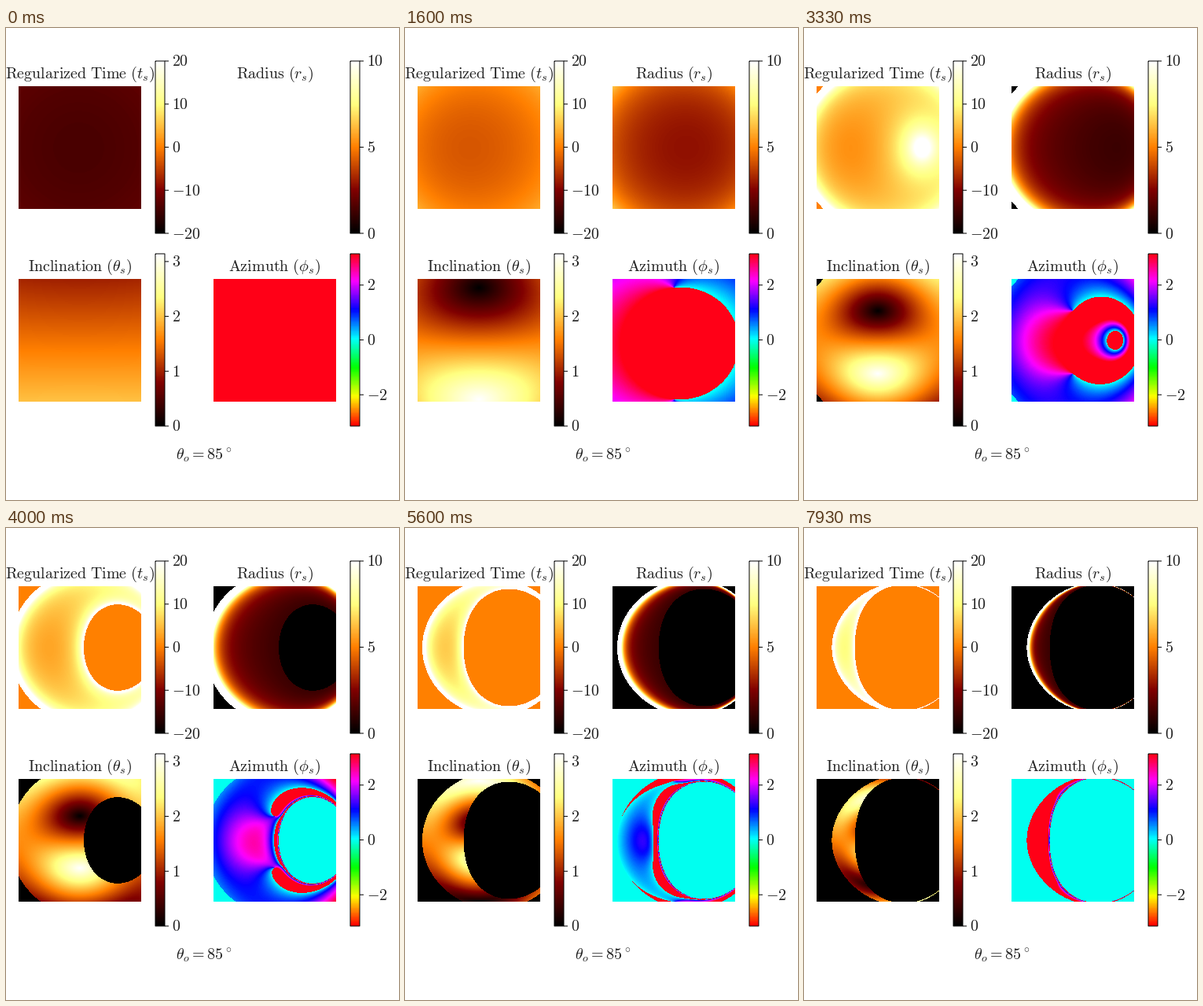
Recreate the animation shown at these times as a matplotlib script. Size 500 by 600 pixels, loop 8000 ms.

```python
import numpy as np
import matplotlib.pyplot as plt
from matplotlib.animation import FuncAnimation

plt.rcParams["mathtext.fontset"] = "cm"

W, H, DPI = 500, 600, 100
PX = 72 / DPI         # one pixel in points
FRAMES, LOOP = 120, 8000

# Spinning black hole seen by a distant camera, one ray per screen pixel
A = 0.99
THETA_O = np.radians(85)
HALF = 4.99           # offset of the outermost rays
N = 156
U_HORIZON = 1 / (1 + np.sqrt(1 - A * A))
T_FIRST, T_STEP, SUB = 0.1, 2.9 / 289, 2

axis = np.linspace(-HALF, HALF, N)
alpha, beta = np.meshgrid(axis, -axis)
lam = -alpha * np.sin(THETA_O)
eta = (alpha**2 - A**2) * np.cos(THETA_O)**2 + beta**2
U2 = A**2 - lam**2 - eta
U3 = 2 * (eta + (lam - A)**2)
U4 = -A**2 * eta


def slope(s):
    """Rates of u=1/r, u', p=sin(theta)e^(i psi), p', cos(theta), its rate, drag, time."""
    u, du, p, dp, mu, dmu = s[:6]
    s2 = np.abs(p)**2
    delta = 1 - 2 * u + (A * u)**2
    k = 1 + (A * A - A * lam) * u**2
    drag = A * k / delta - A
    f = (1 + (A * u)**2) * k / delta + u**2 * (A * lam - A**2 * s2)
    time = (f - du - 2 * u * du) / u**2
    return [du, U2 * u + 1.5 * U3 * u**2 + 2 * U4 * u**3,
            dp, p * (2 * A**2 * s2 - eta - lam**2 - 2 * A**2),
            dmu, (A**2 - eta - lam**2) * mu - 2 * A**2 * mu**3,
            drag, time]


def rk4(s, h):
    k1 = slope(s)
    k2 = slope([x + h / 2 * k for x, k in zip(s, k1)])
    k3 = slope([x + h / 2 * k for x, k in zip(s, k2)])
    k4 = slope([x + h * k for x, k in zip(s, k3)])
    return [x + h / 6 * (a + 2 * b + 2 * c + d)
            for x, a, b, c, d in zip(s, k1, k2, k3, k4)]


def start(t):
    u = np.full((N, N), t)
    du = np.sqrt(1 + U2 * u**2 + U3 * u**3 + U4 * u**4)
    dp = -np.cos(THETA_O) * beta - 1j * alpha
    dmu = np.sin(THETA_O) * beta
    zero = np.zeros((N, N))
    return [u, du, np.sin(THETA_O) + t * dp, dp,
            np.cos(THETA_O) + t * dmu, dmu, zero, zero]


def coordinates(s, live):
    u, _, p, _, mu, _, drag, time = s
    r = 1 / u
    t = time - r - 2 * np.log(np.abs(r))
    theta = np.arctan2(np.abs(p), mu)
    phi = np.mod(-np.pi / 2 - np.angle(p) - drag, 2 * np.pi)
    return [np.where(live, v, 0).astype("float32") for v in (t, r, theta, phi)]


def trace():
    t0 = 1e-3
    s, live, out = start(t0), np.ones((N, N), bool), []

    def advance(span, steps):
        nonlocal s, live
        for _ in range(steps):
            new = rk4(s, span / steps)
            live = live & (new[0] > 0) & (new[0] < U_HORIZON)
            s = [np.where(live, b, a) for a, b in zip(s, new)]

    with np.errstate(all="ignore"):
        advance(T_FIRST - t0, 40)
        for _ in range(FRAMES):
            out.append(coordinates(s, live))
            advance(T_STEP, SUB)
    return out


fields = trace()

fig = plt.figure(figsize=(W / DPI, H / DPI), dpi=DPI, facecolor="white")
ax = fig.add_axes([0, 0, 1, 1])
ax.axis("off")


def label(x, y, text, ha="center"):
    ax.text(x, y, text, fontsize=20 * PX, ha=ha, va="baseline", color="0.12")


def line(xs, ys):
    ax.plot(xs, ys, color="black", lw=PX, snap=False, solid_capstyle="butt")


def panel(x, y, title, cmap, lo, hi, ticks):
    img = ax.imshow(fields[0][0], cmap=cmap, vmin=lo, vmax=hi, interpolation="nearest",
                    extent=(x, x + N, y + N, y))
    label(x + N / 2, y - 10, title)
    left, right, top, bottom = x + 174, x + 186, y - 32, y + 187
    ax.imshow(np.linspace(1, 0, 256)[:, None], cmap=cmap, vmin=0, vmax=1,
              extent=(left, right, bottom, top), aspect="auto")
    line([left, right, right, left, left], [top, top, bottom, bottom, top])
    for v in ticks:
        ty = bottom - (v - lo) / (hi - lo) * (bottom - top)
        line([right, right + 5], [ty, ty])
        label(right + 9, ty + 6.5, f"${v}$", "left")
    return img


PI = np.pi
images = [
    panel(16, 74, r"$\mathrm{Regularized\ Time\ }(t_s)$", "afmhot", -20, 20, range(-20, 21, 10)),
    panel(264, 74, r"$\mathrm{Radius\ }(r_s)$", "afmhot", 0, 10, (0, 5, 10)),
    panel(16, 319, r"$\mathrm{Inclination\ }(\theta_s)$", "afmhot", 0, PI, (0, 1, 2, 3)),
    panel(264, 319, r"$\mathrm{Azimuth\ }(\phi_s)$", "hsv", -PI, PI, (-2, 0, 2)),
]
label(252, 549, r"$\theta_o=85^\circ$")
ax.set_xlim(0, W)
ax.set_ylim(H, 0)
ax.set_aspect("auto")


def update(i):
    for img, data in zip(images, fields[i]):
        img.set_data(data)
    return images


anim = FuncAnimation(fig, update, frames=FRAMES, interval=LOOP / FRAMES,
                     repeat=True, repeat_delay=0)
plt.show()
```
